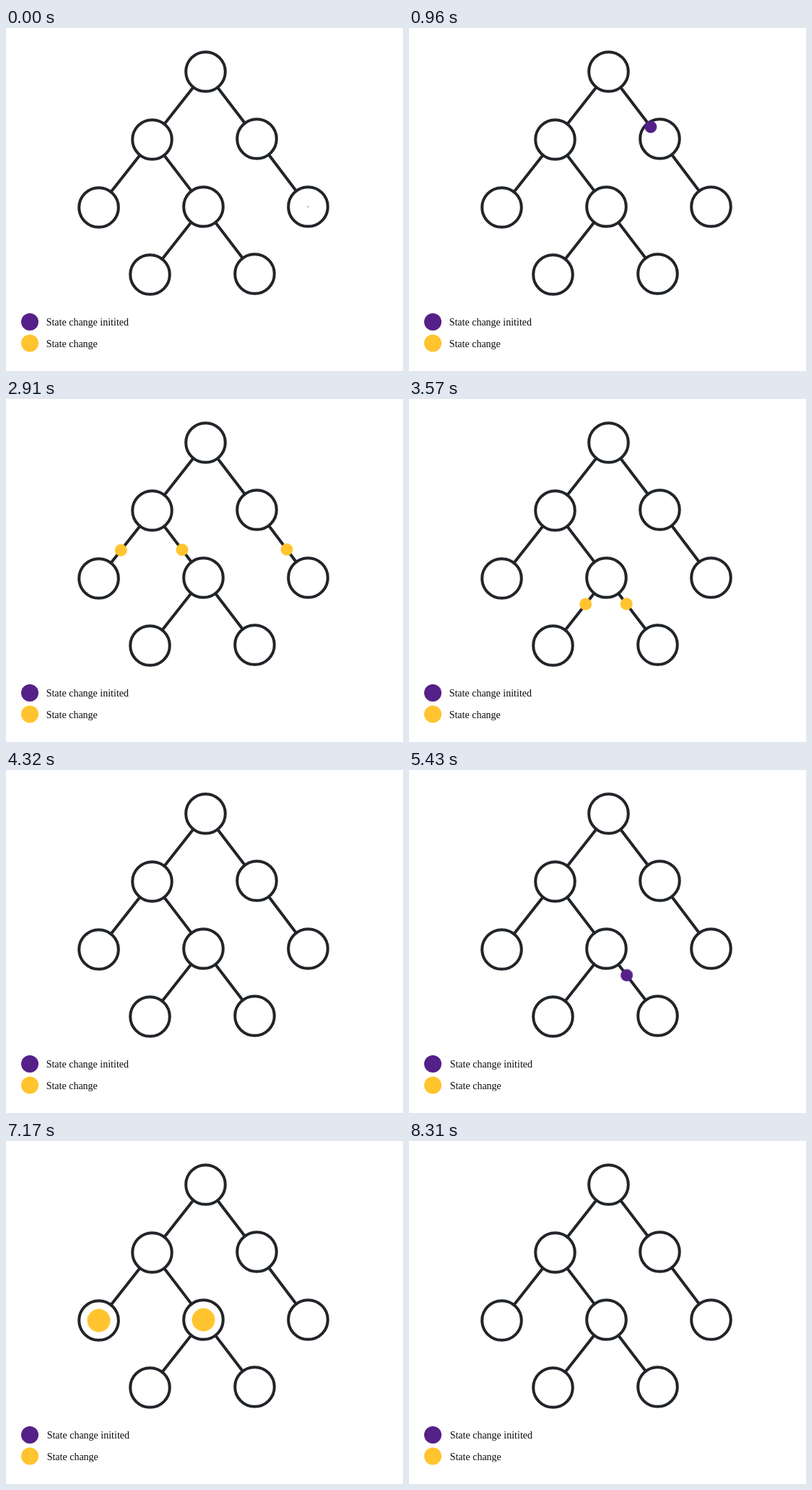
Write an HTML page that moves like this. It is 550 by 475 pixels and loops after 8850 ms.

```html
<!DOCTYPE html>
<html lang="en">
<head>
<meta charset="utf-8">
<title>State change in a tree</title>
<style>
  html, body { margin: 0; width: 100%; height: 100%; overflow: hidden; background: #fff; }
  svg { display: block; width: 550px; height: 475px; }
  .edge, .node { stroke: #212529; stroke-width: 4; }
  .node { fill: #fff; }
  .init { fill: #552088; }
  .change { fill: #ffc42e; }
  text { font: 14px "Liberation Serif", "Times New Roman", serif; fill: #0c0c0c; }

  .labels, .pulse, .dot { animation: 8850ms linear infinite; }
  .labels { animation-name: labels; animation-timing-function: step-end; }
  .pulse { transform: translate(var(--x), var(--y)) scale(0); animation-name: pulse; }
  .dot { opacity: 0; animation-name: hop; }
  .dot.init { animation-name: climb; }

  @keyframes labels {
    0% { transform: translate(0, 0); }
    54.915%, 100% { transform: translate(1px, -.5px); }
  }
  /* 360 ms: grow over the node and shrink back */
  @keyframes pulse {
    0% { transform: translate(var(--x), var(--y)) scale(.02); }
    2.034% { transform: translate(var(--x), var(--y)) scale(1); }
    4.068%, 100% { transform: translate(var(--x), var(--y)) scale(0); }
  }
  /* 540 ms along one edge */
  @keyframes hop {
    0% { opacity: 1; transform: translate(var(--x0), var(--y0)); }
    6.101% { opacity: 1; transform: translate(var(--x1), var(--y1)); }
    6.102%, 100% { opacity: 0; transform: translate(var(--x1), var(--y1)); }
  }
  /* 1020 ms along two edges */
  @keyframes climb {
    0% { opacity: 1; transform: translate(var(--x0), var(--y0)); }
    5.763% { opacity: 1; transform: translate(var(--xm), var(--ym)); }
    11.525% { opacity: 1; transform: translate(var(--x1), var(--y1)); }
    11.526%, 100% { opacity: 0; transform: translate(var(--x1), var(--y1)); }
  }
</style>
</head>
<body>
<svg viewBox="0 0 550 475">
  <g id="edges"></g>
  <g id="nodes"></g>
  <g id="pulses"></g>
  <g id="dots"></g>
  <circle class="init" cx="33" cy="407" r="12"/>
  <circle class="change" cx="33" cy="436.5" r="12"/>
  <g class="labels">
    <text x="55.7" y="412">State change initited</text>
    <text x="55.7" y="442">State change</text>
  </g>
</svg>
<script>
  const tree = {
    root: { at: [276.5, 60.5], kids: ['left', 'right'] },
    left: { at: [202.5, 154.5], kids: ['outer', 'inner'] },
    right: { at: [347.5, 153.5], kids: ['far'] },
    outer: { at: [128.5, 248.5], kids: [] },
    inner: { at: [273.5, 247.5], kids: ['low1', 'low2'] },
    far: { at: [418.5, 247.5], kids: [] },
    low1: { at: [199.5, 341.5], kids: [] },
    low2: { at: [344.5, 340.5], kids: [] }
  };

  function add(layer, tag, attrs, vars = {}, delay = 0) {
    const el = document.createElementNS('http://www.w3.org/2000/svg', tag);
    for (const k in attrs) el.setAttribute(k, attrs[k]);
    for (const k in vars) el.style.setProperty('--' + k, vars[k] + 'px');
    if (delay) el.style.animationDelay = delay + 'ms';
    document.getElementById(layer).append(el);
  }

  const along = (a, b, f) => a.map((v, i) => v + (b[i] - v) * f);

  function pulse(name, kind, start) {
    const [x, y] = tree[name].at;
    add('pulses', 'circle', { class: 'pulse ' + kind, r: 31 }, { x, y }, start);
  }

  function dot(kind, from, to, start, via) {
    const a = tree[from].at, b = tree[to].at, m = via ? tree[via].at : null;
    const [x0, y0] = along(a, m || b, .25);
    const [x1, y1] = along(m || a, b, .75);
    const vars = { x0, y0, x1, y1 };
    if (m) [vars.xm, vars.ym] = m;
    add('dots', 'circle', { class: 'dot ' + kind, r: 8.5 }, vars, start);
  }

  // Change flows down to every descendant, one level each 870 ms.
  function spread(name, start) {
    pulse(name, 'change', start);
    for (const kid of tree[name].kids) {
      dot('change', name, kid, start + 330);
      spread(kid, start + 870);
    }
  }

  function run(source, via, top, start) {
    pulse(source, 'init', start);
    dot('init', source, top, start + 330, via);
    spread(top, start + 1350);
  }

  for (const { at: [x, y], kids } of Object.values(tree)) {
    for (const kid of kids) {
      const [x2, y2] = tree[kid].at;
      add('edges', 'line', { class: 'edge', x1: x, y1: y, x2, y2 });
    }
    add('nodes', 'circle', { class: 'node', cx: x, cy: y, r: 27.3 });
  }

  run('far', 'right', 'root', 0);
  run('low2', 'inner', 'left', 4860);
</script>
</body>
</html>
```
